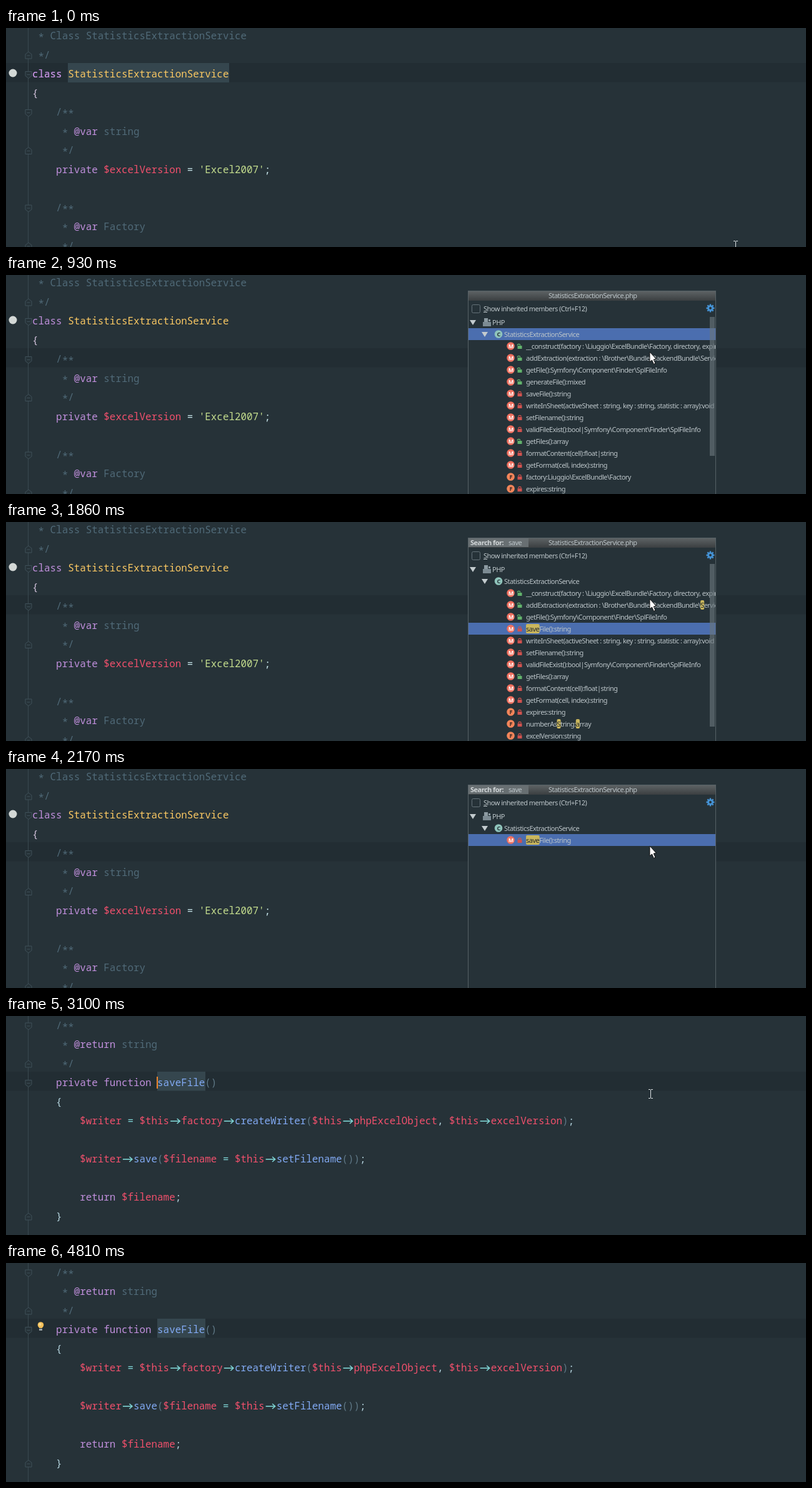
Write an HTML page with a canvas that moves like this. It is 1280 px wide and 350 px high and loops after 4890 ms.

```html
<!DOCTYPE html>
<html lang="en">
<head>
<meta charset="utf-8">
<title>Jump to method</title>
<style>
  html, body { margin: 0; width: 100%; height: 100%; overflow: hidden; background: #263238; }
  canvas { display: block; }
</style>
</head>
<body>
<canvas id="stage" width="1280" height="350"></canvas>
<script>
const ctx = document.getElementById('stage').getContext('2d');
const LOOP = 4890, ROW = 30.5, CELL = 9.528, LEFT = 42;
const CODE_FONT = '15.88px "Noto Sans Mono", monospace';
const UI_FONT = '11px "Noto Sans", sans-serif';
const BG = '#263238';

// Each code token starts with the letter of its colour.
const COLORS = {
  c: '#506a78', k: '#c08fdc', t: '#fac863', v: '#f0506c', s: '#c3dc8d',
  o: '#c8e6ea', a: '#80d8d8', f: '#82aaf4', g: '#5f7886', p: '#b4d4de', b: '#d3c3dc'
};

const classView = {
  top: 0,
  folds: { 1: 'up', 2: 'down', 4: 'down', 6: 'up', 9: 'down', 11: 'up' },
  lines: [
    'c * Class StatisticsExtractionService',
    'c */',
    'kclass |tStatisticsExtractionService',
    'b{',
    'c    /**',
    'c     * |k@var |cstring',
    'c     */',
    "k    private |v$excelVersion|o = |s'Excel2007'|o;",
    '',
    'c    /**',
    'c     * |k@var |cFactory',
    'c     */'
  ]
};

const methodView = {
  top: 2.5,
  folds: { 0: 'down', 2: 'up', 3: 'down', 10: 'up' },
  lines: [
    'c    /**',
    'c     * |k@return |cstring',
    'c     */',
    'k    private function |fsaveFile|g()',
    'p    {',
    'v        $writer|a = |v$this|a->|vfactory|a->|fcreateWriter|g(|v$this|a->|vphpExcelObject|p, |v$this|a->|vexcelVersion|g)|p;',
    '',
    'v        $writer|a->|fsave|g(|v$filename|a = |v$this|a->|fsetFilename|g())|p;',
    '',
    'k        return |v$filename|p;',
    'p    }'
  ]
};

// Kind (Method / Field), visibility (+ public, - private), signature; [ ] marks a hit for "sa".
const members = [
  'M+__construct(factory : \\Liuggio\\ExcelBundle\\Factory, directory, expires)',
  'M+addExtraction(extraction : \\Brother\\Bundle\\BackendBundle\\[S]ervice\\Extraction)',
  'M+getFile():Symfony\\Component\\Finder\\SplFileInfo',
  'M+generateFile():mixed',
  'M-[sa]veFile():string',
  'M-writeInSheet(activeSheet : string, key : string, statistic : array):void',
  'M-setFilename():string',
  'M-validFileExist():bool|Symfony\\Component\\Finder\\SplFileInfo',
  'M+getFiles():array',
  'M-formatContent(cell):float|string',
  'M-getFormat(cell, index):string',
  'F-factory:Liuggio\\ExcelBundle\\Factory',
  'F-expires:string',
  'F-numberAs[S]tring:[a]rray',
  'F-excelVersion:string'
];
const plain = members.map(m => m.replace(/[[\]]/g, ''));
const matching = members.filter(m => !/generateFile|factory:/.test(m));
const narrowed = matching.slice(0, 4).map(m => m.replace('[sa]ve', '[save]').replace('[S]', 'S'));

const popupStates = [
  { at: 610, rows: null },
  { at: 690, rows: plain, selected: 1, thumb: 289 },
  { at: 1550, query: 'sa', rows: matching, selected: 5, thumb: 327 },
  { at: 1860, query: 'save', rows: matching.map(m => m.replace('[sa]ve', '[save]')), selected: 5, thumb: 327 },
  { at: 1940, query: 'save', rows: narrowed, selected: 5 },
  { at: 2170, query: 'save', rows: narrowed.slice(3), selected: 2 },
  { at: 2790 }
];

const pointerStates = [
  { at: 0, x: 1167, y: 347 }, { at: 70, x: 1150, y: 290 }, { at: 150, x: 1062, y: 160 },
  { at: 220, x: 1031, y: 124 }, { at: 690, x: 1030, y: 123, arrow: true },
  { at: 2790, x: 1031, y: 124 }, { at: 4260, x: 1110, y: 205 },
  { at: 4340, x: 1219, y: 305 }, { at: 4420 }
];

const stateAt = (states, t) => states.filter(s => s.at <= t).pop() || {};
const between = (t, from, to) => t >= from && t < to;

function rect(x, y, w, h, color) {
  ctx.fillStyle = color;
  ctx.fillRect(x, y, w, h);
}

function path(points, { fill, stroke, width = 1, close = true }) {
  ctx.beginPath();
  points.forEach(([x, y]) => ctx.lineTo(x, y));
  if (close) ctx.closePath();
  if (fill) { ctx.fillStyle = fill; ctx.fill(); }
  if (stroke) { ctx.strokeStyle = stroke; ctx.lineWidth = width; ctx.stroke(); }
}

function disc(x, y, r, color) {
  ctx.fillStyle = color;
  ctx.beginPath();
  ctx.arc(x, y, r, 0, 7);
  ctx.fill();
}

function roundBox(x, y, w, h, r, color, stroked) {
  ctx.beginPath();
  ctx.roundRect(x, y, w, h, r);
  ctx.lineWidth = 1;
  ctx[stroked ? 'strokeStyle' : 'fillStyle'] = color;
  stroked ? ctx.stroke() : ctx.fill();
}

function drawArrowLigature(x, y) {
  const style = { stroke: COLORS.a, width: 1.6, close: false };
  path([[x + 2, y], [x + 17, y]], style);
  path([[x + 12.5, y - 4], [x + 17, y], [x + 12.5, y + 4]], style);
}

function drawCodeLine(line, baseline) {
  let col = 0;
  for (const token of line.split('|')) {
    const text = token.slice(1);
    ctx.fillStyle = COLORS[token[0]];
    if (text === '->') drawArrowLigature(LEFT + col * CELL, baseline - 5);
    // Asterisks sit at mid-height, as in a coding font.
    else [...text].forEach((ch, i) =>
      ctx.fillText(ch, LEFT + (col + i) * CELL, baseline + (ch === '*' ? 3 : 0)));
    col += text.length;
  }
}

function drawFold(y, direction) {
  const s = direction === 'up' ? -1 : 1;
  path([[31, y - 5 * s], [41, y - 5 * s], [41, y + 2 * s], [36, y + 6 * s], [31, y + 2 * s]],
    { fill: BG, stroke: '#3f5059' });
  rect(33.5, y - .5, 5, 1, '#3f5059');
}

function drawEditor(view, activeRow, selection) {
  const rowTop = row => view.top - 5 + row * ROW;
  rect(0, rowTop(activeRow), 1280, ROW, '#222d33');
  if (selection) rect(selection[0], rowTop(activeRow), selection[1], ROW, '#35464e');
  rect(35, 0, 1, 350, '#3a4950');
  for (const row in view.folds) drawFold(view.top + 13.5 + row * ROW, view.folds[row]);
  ctx.font = CODE_FONT;
  view.lines.forEach((line, i) => drawCodeLine(line, view.top + 18 + i * ROW));
}

function uiText(text, x, y, color = '#bcc5c9') {
  ctx.fillStyle = color;
  ctx.fillText(text, x, y + 4);
}

function badge(letter, x, y, color, ink) {
  disc(x, y, 6.3, color);
  ctx.font = 'bold 9px "Noto Sans", sans-serif';
  ctx.textAlign = 'center';
  uiText(letter, x + .2, y - .7, ink);
  ctx.textAlign = 'left';
  ctx.font = UI_FONT;
}

function drawLock(x, y, open) {
  const color = open ? '#62b36c' : '#d0524e';
  rect(x - 3.5, y - 1, 7, 5, color);
  ctx.strokeStyle = color;
  ctx.lineWidth = 1.3;
  ctx.beginPath();
  ctx.arc(x - (open ? 1.5 : 0), y - 1.5, 2.2, Math.PI, 0);
  ctx.stroke();
}

function drawGear(x, y) {
  for (let i = 0; i < 8; i++) {
    const a = i * Math.PI / 4;
    path([[x, y], [x + 6.5 * Math.cos(a), y + 6.5 * Math.sin(a)]], { stroke: '#4593d6', width: 2.4 });
  }
  disc(x, y, 4.8, '#4593d6');
  disc(x, y, 2, BG);
}

function drawExpander(x, y) {
  path([[x - 5, y - 3.5], [x + 5, y - 3.5], [x, y + 4.5]], { fill: '#c3cbce' });
}

function drawMember(member, y, query) {
  const isMethod = member[0] === 'M';
  badge(member[0], 807.5, y, isMethod ? '#f0705f' : '#f3855a', isMethod ? '#fff' : '#3a2a26');
  drawLock(822, y + .5, member[1] === '+');
  let x = 832;
  member.slice(2).split(/[[\]]/).forEach((part, i) => {
    const hit = i % 2, width = ctx.measureText(part).width;
    if (hit) roundBox(x, y - 7.5, width + .5, 15, 2, query === 'save' ? '#c9b65d' : '#c0a25a');
    uiText(part, x, y, hit ? '#22282b' : undefined);
    x += width;
  });
}

function drawTitle(query) {
  const shade = ctx.createLinearGradient(0, 26, 0, 41);
  shade.addColorStop(0, '#5d6264');
  shade.addColorStop(1, '#3b3f41');
  rect(740, 26, 395, 15, shade);
  uiText('StatisticsExtractionService.php', 868, 33);
  if (!query) return;
  rect(740, 26, query === 'sa' ? 84 : 96, 14, '#686f72');
  ctx.font = 'bold ' + UI_FONT;
  uiText('Search for:', 743, 32.5, '#d0d5d7');
  ctx.font = UI_FONT;
  uiText(query, 804, 32.5);
}

function drawPopup({ rows, query, selected, thumb }) {
  const rowY = i => 75.5 + i * 19;
  ctx.save();
  ctx.beginPath();
  ctx.rect(739, 25, 397, 325);
  ctx.clip();
  rect(739, 25, 397, 326, '#566166');
  rect(740, 26, 395, 325, BG);
  ctx.font = UI_FONT;
  ctx.letterSpacing = '-0.52px';
  drawTitle(query);

  roundBox(745.5, 47.5, 13, 13, 2, '#66737a', true);
  uiText('Show inherited members (Ctrl+F12)', 764, 53.5);
  rect(764, 59, 6, 1, '#bcc5c9');
  drawGear(1127, 53);

  if (rows) {
    rect(740, rowY(selected) - 9.5, 395, 19, '#4b6eaf');
    drawExpander(747, rowY(0));
    rect(765, 69, 6, 8, '#8c9aa1');
    rect(763, 75, 13, 7, '#7c8b93');
    rect(772, 71, 3, 3, '#8c9aa1');
    uiText('PHP', 778, rowY(0));
    drawExpander(766, rowY(1));
    badge('C', 788, rowY(1), '#8fc4bb', '#263238');
    uiText('StatisticsExtractionService', 797, rowY(1));
    ctx.save();
    ctx.beginPath();
    ctx.rect(740, 60, 395, 290);
    ctx.clip();
    rows.forEach((member, i) => drawMember(member, rowY(i + 2), query));
    ctx.restore();
    if (thumb) rect(1126, 67, 8, thumb - 67, 'rgba(105,117,123,.65)');
  }
  ctx.letterSpacing = '0px';
  ctx.restore();
}

function drawPointer({ x, y, arrow }) {
  if (x === undefined) return;
  if (arrow) {
    const outline = [[0, 0], [0, 16], [3.5, 13], [6.5, 19.5], [9, 18.3], [6.2, 12], [10.5, 11.5]];
    path(outline.map(([dx, dy]) => [x + dx, y + dy]), { fill: '#fff', stroke: '#111' });
    return;
  }
  rect(x, y - 6, 1, 13, '#dde3e5');
  for (const dy of [-7, 7]) {
    rect(x - 3, y + dy, 3, 1, '#dde3e5');
    rect(x + 1, y + dy, 3, 1, '#dde3e5');
  }
}

function drawBulb() {
  disc(55.5, 99, 4.8, '#f3c05a');
  disc(54.5, 98, 2.2, '#fbd98c');
  rect(53, 102, 5, 2, '#f3c05a');
  rect(53, 105, 5, 3, '#9aa3a6');
}

function draw(t) {
  rect(0, 0, 1280, 350, BG);
  if (t < 2870) {
    const moved = t >= 220;
    drawEditor(classView, moved ? 4 : 2, null);
    if (t < 380) {
      rect(99, 56, 258, 31, '#35464e');
      ctx.font = CODE_FONT;
      drawCodeLine(classView.lines[2], 18 + 2 * ROW);
    }
    disc(11, 72, 6.5, '#d3d8d6');
    if (between(t, 220, 610)) rect(108, 126, 2, 19, '#ffd400');
    if (between(t, 610, 2790)) drawPopup(stateAt(popupStates, t));
  } else {
    drawEditor(methodView, 3, t >= 3100 && [242, 77]);
    if (t >= 3640) drawBulb();
    if (t < 3820 || between(t, 4340, 4810)) rect(241, 97, 2, 19, '#f0862c');
  }
  drawPointer(stateAt(pointerStates, t));
}

function tick() {
  draw(performance.now() % LOOP);
  requestAnimationFrame(tick);
}
tick();
</script>
</body>
</html>
```
